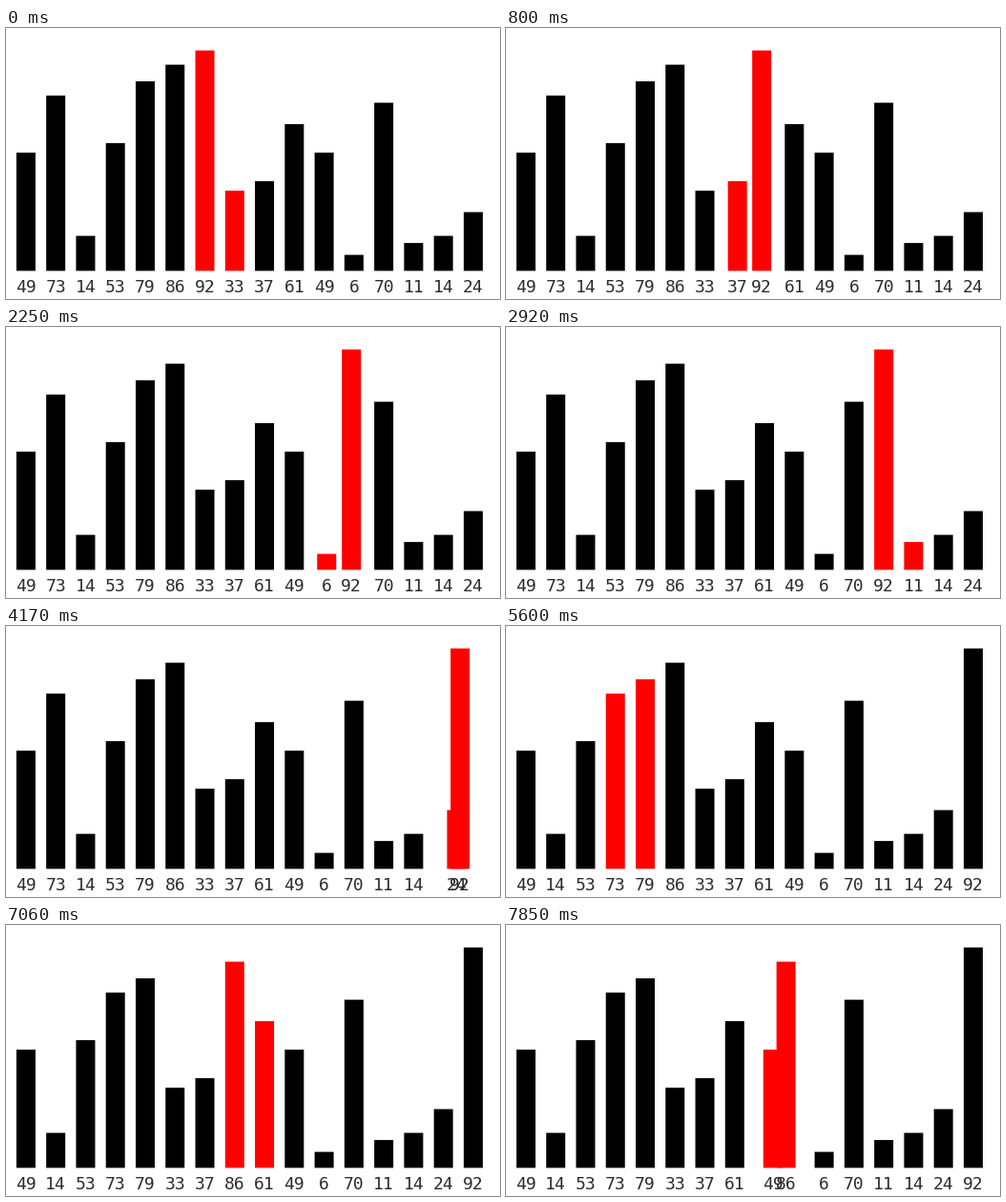
Write a matplotlib script that moves like this. It is 518 px wide and 285 px high and loops after 8000 ms.

```python
import matplotlib.pyplot as plt
from matplotlib.animation import FuncAnimation
from matplotlib.patches import Rectangle

W, H, DPI = 518, 285, 100
LOOP, TICK = 8000, 20
POSES = 60  # distinct poses per loop: the motion is shown at 7.5 per second
LEFT, PITCH, BAR_W, BASE = 10.9, 31.27, 20, 255.4
VALUES = [49, 73, 14, 53, 79, 86, 92, 33, 37, 61, 49, 6, 70, 11, 14, 24]
FIRST = 6                # the first pass is joined at this pair
START = -106             # the first pair was lit a little before the loop
WAIT, MOVE = 258, 230    # ms a pair stays lit, ms a swap takes


def plan():
    """Run the bubble sort; list start, pair and order of every comparison."""
    order, i, t, rows = list(range(len(VALUES))), FIRST, START, []
    while t < LOOP:
        rows.append((t, i, order[:]))
        t += WAIT
        if VALUES[order[i]] > VALUES[order[i + 1]]:
            order[i], order[i + 1] = order[i + 1], order[i]
            t += MOVE
        i = (i + 1) % (len(VALUES) - 1)
    return rows


PLAN = plan()

fig = plt.figure(figsize=(W / DPI, H / DPI), dpi=DPI, facecolor="white")
ax = fig.add_axes([0, 0, 1, 1])
ax.set(xlim=(0, W), ylim=(H, 0))
ax.axis("off")

bars, labels = [], []
for v in VALUES:
    h = 2.5 * v + 1.8
    bars.append(ax.add_patch(Rectangle((0, BASE - h), BAR_W, h, lw=0,
                                       snap=False)))
    labels.append(ax.text(0, 278.5, str(v), ha="center", va="baseline",
                          family="DejaVu Sans Mono", color="#2c2c2c",
                          fontsize=18 * 72 / DPI))


def ease_out(u):
    u = min(max(u, 0), 1)
    return 1 - (1 - u) ** 2


def draw(n):
    # Hold each pose until the next one is due
    pose = int((n + 1.5) * TICK * POSES / LOOP)
    t = pose * LOOP / POSES
    start, i, order = [row for row in PLAN if row[0] <= t][-1]
    shift = ease_out((t - start - WAIT) / MOVE)
    for slot, k in enumerate(order):
        pos = slot + (shift if slot == i else -shift if slot == i + 1 else 0)
        x = LEFT + PITCH * pos
        bars[k].set_x(x)
        bars[k].set_facecolor("red" if slot in (i, i + 1) else "black")
        labels[k].set_x(x + BAR_W / 2)
    return bars + labels


anim = FuncAnimation(fig, draw, frames=LOOP // TICK, interval=TICK,
                     repeat=True, repeat_delay=0, blit=False)
plt.show()
```
